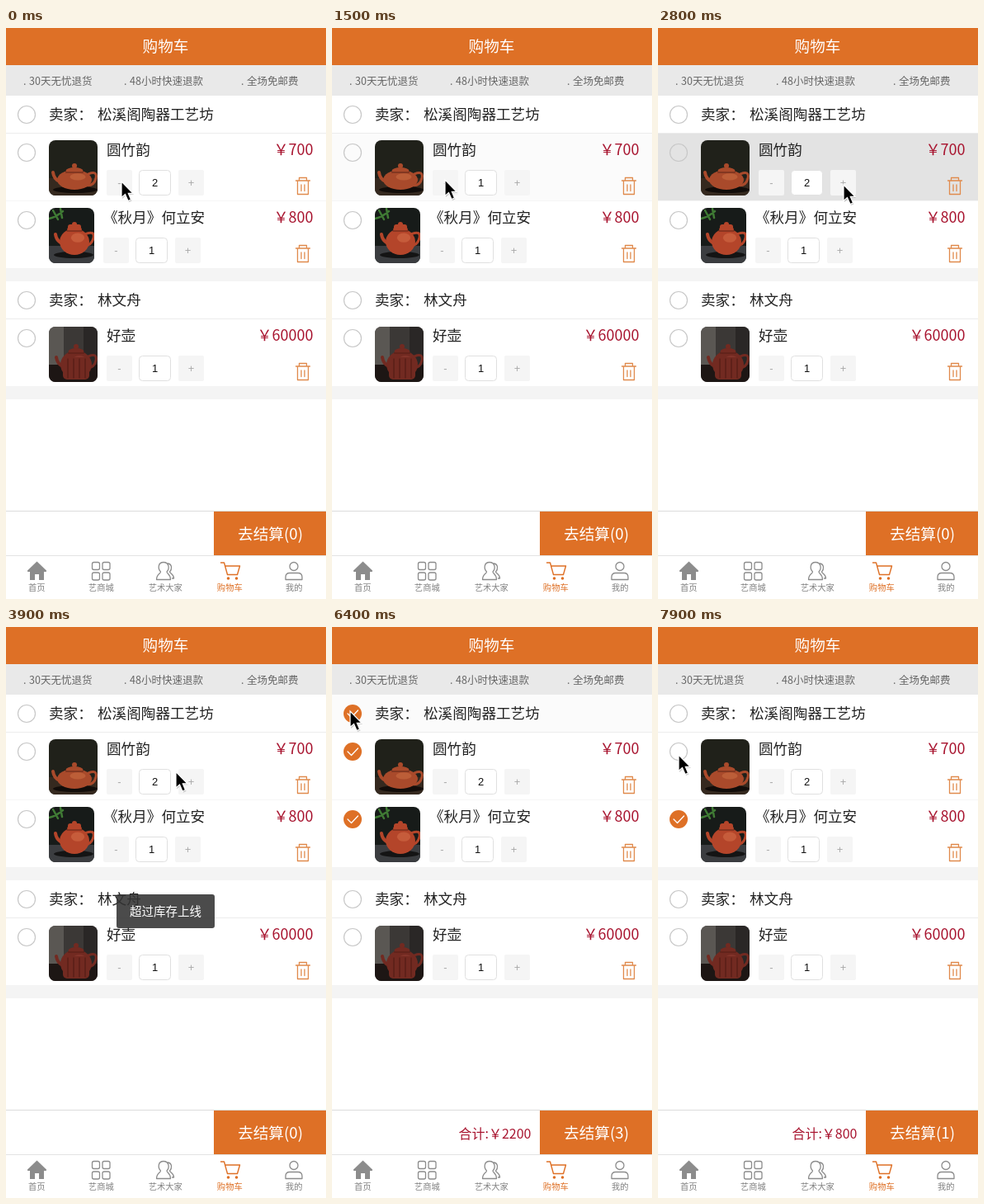
These frames come from a looping animation (388x692 px, 8000 ms). An HTML page:

```html
<!DOCTYPE html>
<html lang="zh-CN">
<head>
<meta charset="utf-8">
<title>购物车</title>
<style>
html, body { margin: 0; width: 100%; height: 100%; overflow: hidden; background: #fff; }
svg { display: block; width: 100vw; height: 100vh; font-family: "Noto Sans CJK SC", "Noto Sans CJK", sans-serif; }
.num { font-family: "Liberation Sans", Arial, sans-serif; }
</style>
</head>
<body>
<svg id="stage" viewBox="0 0 388 692"></svg>
<script>
const ORANGE = '#de7026', RED = '#a8142f', GRAY = '#8c8c8c';
const LOOP = 8000, STEP = 100;

// Cursor tip: time, x, y
const PATH = [
  [0, 140, 186], [600, 140, 186], [1100, 137, 184], [1600, 137, 184], [2000, 225, 190],
  [3800, 225, 190], [4000, 187, 161], [4200, 187, 161], [4500, 128, 135], [4600, 128, 135],
  [4800, 80, 109], [5000, 31, 146], [5900, 31, 146], [6100, 22, 102], [6400, 22, 102],
  [7300, 25, 155], [8000, 25, 155]
];
// Taps: time, top of the row, row height
const TAPS = [[1300, 127, 82], [2100, 127, 82], [2800, 127, 82], [5600, 127, 82], [6200, 82, 45], [7600, 127, 82]];
const FADE = [1, 0.6, 0.17];

const rect = (x, y, w, h, fill, more = '') =>
  `<rect x="${x}" y="${y}" width="${w}" height="${h}" fill="${fill}" ${more}/>`;
const line = (d, color, width = 1.2, more = '') =>
  `<path d="${d}" fill="none" stroke="${color}" stroke-width="${width}" stroke-linecap="round" stroke-linejoin="round" ${more}/>`;
const text = (x, mid, size, color, str, anchor = 'start', more = '') =>
  `<text x="${x}" y="${mid + size * 0.375}" font-size="${size}" fill="${color}" text-anchor="${anchor}" ${more}>${str}</text>`;

function check(y, on) {
  return on
    ? `<circle cx="25" cy="${y}" r="11" fill="${ORANGE}"/>` + line(`M19 ${y}l4.5 4.5 8-8.5`, '#fff', 1.3)
    : `<circle cx="25" cy="${y}" r="10.5" fill="none" stroke="#c8c8c8" stroke-width="1.2"/>`;
}

function seller(y, name, on) {
  return check(y + 23, on) + text(52, y + 22.5, 17.6, '#222', '卖家：') +
    text(111, y + 22.5, 17.6, '#222', name) + rect(0, y + 45, 388, 1, '#ececec');
}

function pot(cx, cy, rx, ry, color, shine) {
  const top = cy - ry;
  return line(`M${cx - rx + 3} ${cy + 2}q-7 -3 -8 -11`, color, 4) +
    line(`M${cx + rx - 4} ${cy - ry * 0.6}q11 -4 9 5t-10 9`, color, 3) +
    `<ellipse cx="${cx}" cy="${cy}" rx="${rx}" ry="${ry}" fill="${color}"/>` +
    `<ellipse cx="${cx}" cy="${top + 1}" rx="${rx * 0.5}" ry="4" fill="${color}"/>` +
    `<circle cx="${cx}" cy="${top - 5}" r="3" fill="${color}"/>` +
    line(`M${cx - rx * 0.5} ${top + 3}h${rx}`, '#4a1a12', 0.8) +
    `<ellipse cx="${cx + 4}" cy="${cy - ry * 0.3}" rx="${rx * 0.45}" ry="${ry * 0.35}" fill="${shine}" opacity=".5"/>`;
}

function photo(y, w, id, wall, table, art) {
  return `<clipPath id="p${id}"><rect x="52" y="${y}" width="${w}" height="67" rx="8"/></clipPath>` +
    `<g clip-path="url(#p${id})">` + rect(52, y, w, 67, wall) + rect(52, y + 46, w, 21, table) + art + '</g>';
}

const PHOTOS = [
  photo(136, 59, 1, '#20211a', '#35291f',
    '<ellipse cx="84" cy="196" rx="27" ry="4" fill="#120d0a"/>' + pot(83, 184, 21, 12, '#a94a2b', '#cf7247')),
  photo(218, 55, 2, '#171b19', '#3b3d40',
    line('M52 231q9 -2 17 -9M57 221l6 11M66 219l2 11', '#3f7a34', 2.5) +
    '<ellipse cx="82" cy="275" rx="24" ry="4" fill="#141414"/>' + pot(83, 259, 18, 16, '#b4452a', '#d9744d') +
    rect(75, 238, 16, 7, '#b4452a', 'rx="3"')),
  photo(362, 59, 3, '#3b3836', '#1d1614',
    rect(52, 362, 18, 46, '#5a5753') + rect(94, 362, 17, 46, '#2a2726') +
    pot(85, 408, 19, 17, '#722a21', '#944036') + rect(69, 399, 32, 27, '#722a21', 'rx="5"') +
    line('M75 401v23M82 401v23M89 401v23M96 401v23', '#4c1813', 1))
];

function trash(y) {
  return line(`M351.5 ${y + 4}h17M355.500 ${y + 4}v-3.500h9v3.500M353.500 ${y + 4}v16.500h13v-16.500M358 ${y + 9}v7.500M362 ${y + 9}v7.500`,
    '#e08a4c', 1.3);
}

function item(y, x, photoArt, name, price, qty, on, shift = 0) {
  const by = y + 45 + shift, mid = by + 15.5;
  return check(y + 24, on) + photoArt +
    text(x, y + 20.5, 17.6, '#222', name) +
    text(372.5, y + 20.5, 18, RED, '￥' + price, 'end') +
    rect(x, by, 31, 31, '#f5f5f5', 'rx="2"') + rect(x + 87, by, 31, 31, '#f5f5f5', 'rx="2"') +
    rect(x + 39.5, by + 0.5, 38, 30, '#fff', 'rx="4" stroke="#e0e0e0"') +
    text(x + 15.5, mid, 13, '#aaa', '-', 'middle', 'class="num"') +
    text(x + 102.5, mid, 13, '#aaa', '+', 'middle', 'class="num"') +
    text(x + 58.5, mid, 13, '#111', qty, 'middle', 'class="num"') +
    trash(y + 54);
}

function tabs() {
  const labels = ['首页', '艺商城', '艺术大家', '购物车', '我的'];
  let s = rect(0, 639, 388, 1, '#e3e3e3');
  labels.forEach((label, i) => {
    s += text(37.3 + i * 78, 678, 10.3, i === 3 ? ORANGE : '#808080', label, 'middle');
  });
  s += `<path d="M37.500 646.500L26 657.500q-.5 1.500 1 1.500h2v10h6v-7h5v7h6v-10h2q1.500 0 1-1.500Z" fill="${GRAY}"/>`;
  for (const x of [104.5, 117]) for (const y of [647.5, 660])
    s += rect(x, y, 9, 9, 'none', `rx="2" stroke="${GRAY}" stroke-width="1.3"`);
  s += line('M191 647.500c-7 0 -7 8 -3.500 11.500c.5 2 -5 2.500 -5 9.500h17c0 -7 -5 -7.500 -4.500 -9.500c3.500 -3.500 3 -11.500 -4 -11.500M196.500 649c5 1 5 7 2 10c0 2 5 2.500 5 8h-2', GRAY, 1.3);
  s += line('M260.500 648h4l4 14.500h12l3 -10.500h-17.500', ORANGE, 1.4) +
    `<circle cx="269.500" cy="667" r="1.800" fill="${ORANGE}"/><circle cx="279.500" cy="667" r="1.800" fill="${ORANGE}"/>`;
  s += `<circle cx="349" cy="652.500" r="5" fill="none" stroke="${GRAY}" stroke-width="1.300"/>` +
    line('M339 668.500v-3q0 -5 5 -5h10q5 0 5 5v3z', GRAY, 1.3);
  return s;
}
const TABS = tabs();

const HEADER = rect(0, 0, 388, 45, ORANGE) + text(193.5, 22.5, 18.6, '#fff', '购物车', 'middle') +
  rect(0, 45, 388, 37, '#e9e9e9') +
  [[21, '30天无忧退货'], [143, '48小时快速退款'], [285, '全场免邮费']].map(([x, s]) =>
    text(x, 64, 12.5, '#666', '.') + text(x + 7, 64, 12.5, '#666', s)).join('');

function cursor(t) {
  const i = PATH.findIndex(p => p[0] > t);
  const [t0, x0, y0] = PATH[i - 1], [t1, x1, y1] = PATH[i];
  const k = (t - t0) / (t1 - t0), x = x0 + (x1 - x0) * k, y = y0 + (y1 - y0) * k;
  const d = 'M0 0V19.500L4.500 15.500 8 23.500 11.500 22 8.300 14.300H14Z';
  return `<g transform="translate(${x} ${y})"><path d="${d}" transform="translate(1 1.500)" opacity=".2"/>` +
    `<path d="${d}" stroke="#fff" stroke-width="1.200"/></g>`;
}

function toast(t) {
  if (t < 3400 || t >= 5700) return '';
  return `<g opacity="${t < 3500 ? 0.6 : 1}">` + rect(134, 324, 119, 41, '#333', 'rx="3" opacity=".88"') +
    text(193.5, 345, 14.5, '#fff', '超过库存上线', 'middle') + '</g>';
}

function render(t) {
  const qty = t >= 1400 && t < 2200 ? 1 : 2;
  const first = t >= 5700 && t < 7700, second = t >= 6300;
  const count = (first ? qty : 0) + (second ? 1 : 0);
  const sum = (first ? 700 * qty : 0) + (second ? 800 : 0);
  let s = rect(0, 0, 388, 692, '#fff') + HEADER;
  for (const [at, y, h] of TAPS) {
    const level = FADE[(t - at) / STEP];
    if (level) s += rect(0, y, 388, h, '#e3e3e3', `opacity="${level}"`);
  }
  s += seller(82, '松溪阁陶器工艺坊', first && second) +
    item(127, 122, PHOTOS[0], '圆竹韵', 700, qty, first) +
    rect(0, 209, 388, 1, '#f6f6f6') +
    item(209, 118, PHOTOS[1], '《秋月》何立安', 800, 1, second) +
    rect(0, 291, 388, 16, '#f4f4f4') +
    seller(307, '林文舟', false) +
    item(352, 122, PHOTOS[2], '好壶', 60000, 1, false) +
    rect(0, 434, 388, 16, '#f4f4f4') +
    rect(0, 585, 388, 1, '#dcdcdc') + rect(252, 586, 136, 53, ORANGE) +
    text(320.5, 613, 18.7, '#fff', `去结算(${count})`, 'middle');
  if (sum) s += text(241.5, 613.5, 16, RED, '合计:￥' + sum, 'end');
  return s + TABS + toast(t) + cursor(t);
}

const stage = document.getElementById('stage');
let shown = -1;
function tick(now) {
  const t = Math.floor(now % LOOP / STEP) * STEP;
  if (t !== shown) {
    shown = t;
    stage.innerHTML = render(t);
  }
  requestAnimationFrame(tick);
}
tick(performance.now());
</script>
</body>
</html>
```
